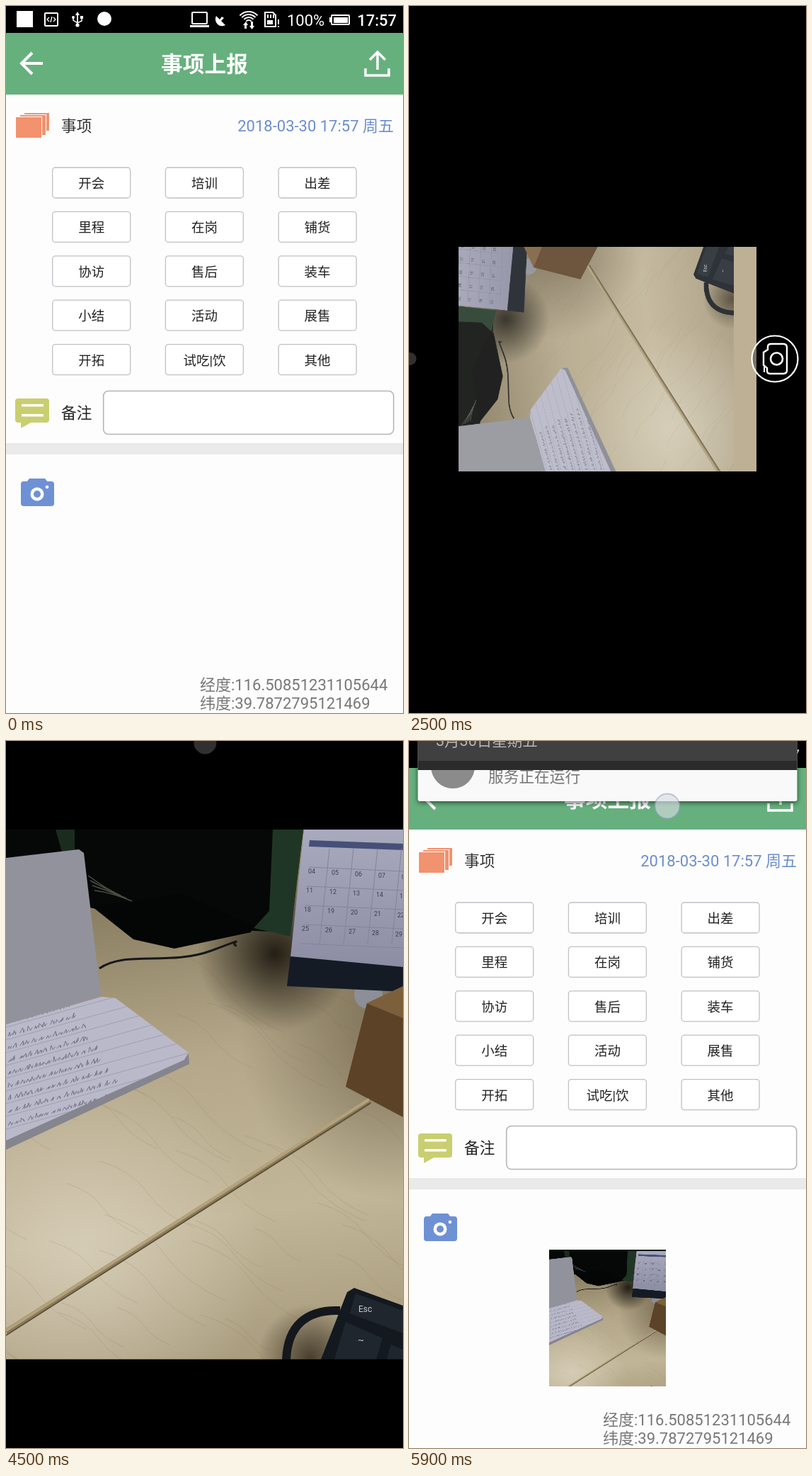
Animation, 561 px wide and 998 px high, one loop 6000 ms. Source, as an HTML page with a canvas:

```html
<!DOCTYPE html>
<html lang="zh-CN">
<meta charset="utf-8">
<style>
  html, body { margin: 0; height: 100%; overflow: hidden; background: #000; }
  canvas { display: block; }
</style>
<canvas id="stage" width="561" height="998"></canvas>
<script>
const W = 561, H = 998, CX = 280.5, CY = 498.5;
const DOWN_X = .5645, DOWN_Y = .5624; // portrait screen fitted into the landscape band
const FONT = 'Roboto, "Noto Sans CJK SC", "Noto Sans CJK", sans-serif';
const stage = document.getElementById('stage').getContext('2d');
let c = stage;

const lerp = (a, b, p) => a + (b - a) * p;
const clamp = v => Math.max(0, Math.min(1, v));
const easeOut = v => 1 - (1 - clamp(v)) ** 5;

function layer() {
  const el = document.createElement('canvas');
  el.width = W;
  el.height = H;
  return el.getContext('2d');
}
function paintOn(target, draw) {
  const previous = c;
  c = target;
  c.save();
  draw();
  c.restore();
  c = previous;
}
function rect(color, x, y, w, h) {
  c.fillStyle = color;
  c.fillRect(x, y, w, h);
}
function path(points) {
  c.beginPath();
  for (let i = 0; i < points.length; i += 2) c.lineTo(points[i], points[i + 1]);
}
function poly(color, ...points) {
  path(points);
  c.fillStyle = color;
  c.fill();
}
function line(color, width, ...points) {
  path(points);
  c.strokeStyle = color;
  c.lineWidth = width;
  c.stroke();
}
function curve(color, width, d) {
  c.strokeStyle = color;
  c.lineWidth = width;
  c.stroke(new Path2D(d));
}
function disc(color, x, y, r) {
  c.beginPath();
  c.arc(x, y, r, 0, 7);
  c.fillStyle = color;
  c.fill();
}
function ring(color, width, x, y, r, from = 0, to = 7) {
  c.beginPath();
  c.arc(x, y, r, from, to);
  c.strokeStyle = color;
  c.lineWidth = width;
  c.stroke();
}
function round(x, y, w, h, r, fill, stroke, width = 1.3) {
  c.beginPath();
  c.roundRect(x, y, w, h, r);
  if (fill) { c.fillStyle = fill; c.fill(); }
  if (stroke) { c.strokeStyle = stroke; c.lineWidth = width; c.stroke(); }
}
function text(s, x, y, size, color, align = 'left', weight = 400) {
  c.font = `${weight} ${size}px ${FONT}`;
  c.textAlign = align;
  c.fillStyle = color;
  c.fillText(s, x, y);
}
function glow(x, y, r, rgb, alpha) {
  const g = c.createRadialGradient(x, y, 0, x, y, r);
  g.addColorStop(0, `rgba(${rgb},${alpha})`);
  g.addColorStop(1, `rgba(${rgb},0)`);
  rect(g, 0, 0, W, H);
}
function turned(degrees, sx, sy, alpha, draw) {
  c.save();
  c.globalAlpha = alpha;
  c.translate(CX, CY);
  c.rotate(degrees * Math.PI / 180);
  c.scale(sx, sy);
  c.translate(-CX, -CY);
  draw();
  c.restore();
}

function statusBar(waves) {
  const w = '#fff';
  rect('#000', 0, 0, W, 38);
  rect(w, 15, 7, 23, 23);
  round(55, 10, 18, 18, 1, null, w, 2);
  line(w, 1.3, 61, 16, 58, 19, 61, 22);
  line(w, 1.3, 67, 16, 70, 19, 67, 22);
  line(w, 1.3, 65, 15, 63, 23);
  line(w, 1.8, 101, 11, 101, 27);
  line(w, 1.5, 95, 17, 95, 20, 101, 24, 107, 21, 107, 17);
  poly(w, 98, 13, 101, 8, 104, 13);
  disc(w, 101, 27, 2.6);
  disc(w, 95, 16, 2);
  rect(w, 105, 14, 4, 4);
  disc(w, 139, 18, 10);
  round(263, 9, 21, 16, 1, null, w, 2);
  rect(w, 260, 27, 27, 3);
  c.fillStyle = w;
  c.fill(new Path2D('M297 14C293 22 301 32 310 27L304 21L308 17L305 15L302 19Z'));
  if (waves) {
    ring(w, 2, 304, 20, 7, -1.5, .1);
    ring(w, 2, 304, 20, 12, -1.5, .1);
  }
  for (const r of [5, 9, 13, 17]) ring(w, 2, 343, 25, r, -2.4, -.75);
  poly(w, 335, 27, 339, 22, 342, 27);
  rect(w, 337, 26, 3, 6);
  poly(w, 344, 28, 351, 28, 347.5, 33);
  rect(w, 346, 22, 3, 7);
  line(w, 2, 366, 9, 377, 9, 381, 13, 381, 29, 366, 29, 366, 8);
  for (const x of [369, 373, 377]) rect(w, x, 12, 2, 5);
  rect(w, 369, 20, 8, 6);
  rect(w, 384, 19, 2, 7);
  rect(w, 384, 28, 2, 2);
  text('100%', 397, 28, 22, w);
  round(460, 13, 25, 13, 1, null, w, 2);
  rect(w, 463, 16, 20, 8);
  rect(w, 457, 16, 3, 7);
  text('17:57', 552, 28, 22, w, 'right', 500);
}

function header() {
  rect('#66b07d', 0, 38, W, 87);
  text('事项上报', 280.5, 93, 30.7, '#fff', 'center', 700);
  line('#fff', 4, 52, 81, 22, 81);
  line('#fff', 4, 37, 66, 22, 81, 37, 96);
  line('#fff', 3.5, 508, 88, 508, 98, 541, 98, 541, 88);
  line('#fff', 3.5, 525, 90, 525, 66);
  line('#fff', 3.5, 514, 76, 525, 65, 536, 76);
}

const LABELS = '开会 培训 出差 里程 在岗 铺货 协访 售后 装车 小结 活动 展售 开拓 试吃|饮 其他'.split(' ');

function form({ waves = true, pressed = false, thumb = false, saving = 0 }) {
  rect('#fefdfe', 0, 0, W, H);
  statusBar(waves);
  header();
  for (const [x, y, w, h] of [[26, 151, 35, 25], [20, 154, 36, 28], [14, 157, 36, 29]]) {
    rect('#fff', x - 1, y - 1, w + 2, h + 2);
    rect('#f2926f', x, y, w, h);
  }
  text('事项', 78, 177, 21.7, '#333');
  text('2018-03-30 17:57 周五', 548, 177, 22, '#6a8dd0', 'right');
  LABELS.forEach((label, i) => {
    const x = 120.7 + i % 3 * 159.7, y = 249.5 + (i / 3 | 0) * 62.4;
    round(x - 55, y - 21.5, 110, 43, 4, '#fff', '#c0c0c6');
    text(label, x, y + 7.5, 18.5, '#222', 'center');
  });
  round(13, 554, 48, 34, 4, '#c9cf70');
  poly('#c9cf70', 21, 586, 21, 596, 37, 587);
  rect('#fff', 22, 562, 31, 3.5);
  rect('#fff', 22, 576, 31, 3.5);
  text('备注', 78, 582, 21.7, '#222');
  round(137.7, 543.5, 410, 61, 7, '#fff', '#b5b5b9', 1.6);
  rect('#ebeaeb', 0, 617, W, 16);

  const blue = pressed ? '#c3c3c7' : '#6e91d5';
  round(21, 671, 47, 35, 4, blue);
  poly(blue, 29, 672, 33, 667, 55, 667, 59, 672);
  disc('#fff', 44, 689, 9.5);
  disc(blue, 44, 689, 5);
  disc('#fff', 58, 679, 2.3);

  text('经度:116.50851231105644', 274, 966, 22, '#777');
  text('纬度:39.7872795121469', 274, 992, 22, '#777');
  if (thumb) {
    c.save();
    c.beginPath();
    c.rect(198, 718, 165, 193);
    c.clip();
    rect('#161a17', 198, 718, 165, 193);
    c.drawImage(desk, 0, 125, W, 748, 198, 720, 165, 220);
    c.restore();
  }
  if (saving) text('正在保存图片...', 277, 563, 20.5, `rgba(120,120,125,${saving})`, 'center');
}

function notebook(rnd) {
  poly('#85858f', 0, 560, 258, 442, 259, 456, 0, 577);
  poly('#92929c', 0, 165, 103, 153, 110, 158, 134, 360, 0, 402);
  poly('#b9b9ca', 0, 400, 135, 361, 155, 363, 258, 440, 252, 450, 0, 564);
  c.save();
  c.clip();
  for (let i = 0; i < 9; i++) {
    const y = 404 + i * 18;
    line('#9899aa', .8, 0, y, 260, y - 72);
    for (let x = 3; x < 90 + i * 9; x += rnd(5, 11)) {
      const b = y - 4 - x * .28;
      line('#6b6c80', .9, x, b, x + rnd(1, 5), b - rnd(4, 8), x + rnd(2, 6), b - 1, x + rnd(4, 8), b - 5);
    }
  }
  c.restore();
}

function calendar() {
  disc('#8c8f98', 512, 358, 20);
  const paper = c.createLinearGradient(0, 125, 0, 320);
  paper.addColorStop(0, '#a9aabd');
  paper.addColorStop(1, '#8c8da4');
  poly(paper, 421, 125, W, 125, W, 320, 402, 305);
  poly('#151b24', 402, 304, W, 319, W, 354, 397, 346);
  poly('#464f78', 429, 140, W, 145, W, 154, 428, 149);
  for (let i = 0; i < 5; i++) {
    line('#82849a', 1, 428 - i * 3, 178 + i * 27, W, 184 + i * 27);
    line('#82849a', 1, 457 + i * 34, 152, 443 + i * 34, 287);
    for (let j = 0; j < 4; j++)
      text(String(4 + j * 7 + i).padStart(2, '0'), 427 + i * 33 - j * 3, 187 + j * 27 + i * 2, 9, '#3d3f50');
  }
}

function keyboard() {
  glow(430, 870, 75, '40,32,20', .75);
  curve('#14181d', 12, 'M472 804C425 802 397 825 396 876');
  poly('#14191f', 445, 873, 482, 778, 492, 772, W, 797, W, 873);
  poly('#20262e', 494, 780, W, 804, W, 836, 486, 808);
  poly('#20262e', 480, 820, 532, 843, 523, 873, 464, 873);
  poly('#20262e', 544, 852, W, 859, W, 873, 538, 873);
  text('Esc', 498, 806, 12, '#c8cbd2');
  text('~', 497, 850, 13, '#c8cbd2');
}

function drawDesk() {
  let seed = 7;
  const rnd = (a, b) => {
    seed = seed * 16807 % 2147483647;
    return a + (b - a) * seed / 2147483647;
  };
  c.beginPath();
  c.rect(0, 125, W, 748);
  c.clip();
  const wood = c.createLinearGradient(180, 230, 280, 873);
  wood.addColorStop(0, '#8a7e62');
  wood.addColorStop(.35, '#b5a88a');
  wood.addColorStop(.7, '#c2b698');
  wood.addColorStop(1, '#aa9d7f');
  rect(wood, 0, 125, W, 748);
  glow(110, 720, 260, '226,219,202', .6);
  glow(560, 420, 230, '60,48,28', .5);
  for (let i = 0; i < 45; i++) {
    const x = rnd(-60, 520), y = rnd(290, 860), l = rnd(50, 150);
    curve('rgba(120,98,62,.18)', 1,
      `M${x} ${y}q${l * .4} ${l * .12} ${l * .6} ${l * .4}t${l * .6} ${l * .45}`);
  }
  // far side: wall, screen and its stand
  glow(380, 300, 110, '22,18,10', .9);
  poly('#060807', 0, 125, 420, 125, 402, 270, 350, 268, 122, 236, 0, 200);
  poly('#1f3626', 377, 125, 420, 125, 402, 276, 350, 264, 372, 240);
  poly('#1a2c1e', 70, 125, 97, 125, 97, 175, 80, 160);
  poly('#040505', 122, 234, 250, 215, 350, 262, 346, 270, 238, 293, 180, 280);
  for (let i = 0; i < 4; i++)
    curve('#4c4d44', 1.5, `M${116 + i * 3} ${190 + i * 7}q25 ${18 - i * 5} ${38 + i * 5} ${24 - i * 3}`);
  curve('#17171a', 3, 'M132 321C170 295 230 318 290 296S312 286 326 289');
  notebook(rnd);
  calendar();
  // box and table seam
  poly('#5c4226', 510, 370, W, 391, W, 531, 480, 488);
  poly('#7c5f3b', 510, 370, W, 346, W, 391);
  line('#8a7b5b', 8, 0, 834, 515, 508);
  line('#b3a27b', 4, 0, 832, 513, 506);
  line('#5a4d34', 1.5, 0, 839, 515, 511);
  keyboard();
}

function cameraScreen({ shift = 0, wash = 0, shutter = true, dot = true }) {
  rect('#000', 0, 340, W, 317);
  c.save();
  c.beginPath();
  c.rect(70, 340, 421, 317);
  c.clip();
  if (shift) rect('#b8aa8a', 70, 340, 421, 317);
  c.translate(shift, 0);
  turned(-90, DOWN_X, DOWN_Y, c.globalAlpha, () => c.drawImage(desk, 0, 0));
  c.translate(-shift, 0);
  if (wash) rect(`rgba(215,213,210,${wash})`, 70, 340, 421, 317);
  c.restore();
  if (dot) disc('#303030', 1.5, 498, 9);
  if (!shutter) return;
  disc('rgba(0,0,0,.35)', 517, 498, 33);
  ring('#fff', 2.2, 517, 498, 32.5);
  curve('#fff', 2.4, 'M512 477H529Q534 477 534 482V514Q534 519 529 519H510Q506 519 506 515V511L501 507V489L507 485V481Q507 477 512 477Z');
  ring('#fff', 2.6, 519.5, 498, 8.5);
  line('#fff', 2, 502, 509, 502, 517);
}

function touch(x, y) {
  disc('rgba(215,222,228,.65)', x, y, 17);
  ring('rgba(150,160,195,.6)', 1.8, x, y, 17.5);
}

function notificationShade(pull) {
  c.save();
  c.translate(0, pull);
  c.shadowColor = 'rgba(0,0,0,.6)';
  c.shadowBlur = 7;
  c.shadowOffsetY = 2;
  round(12.5, -40, 536, 125, 3, '#faf9fa');
  c.shadowColor = 'transparent';
  disc('#8b8b8b', 62, 36, 31);
  text('服务正在运行', 112, 58, 21.7, '#757575');
  rect('#2b2b2b', 12.5, -60, 536, 101);
  rect('#404040', 12.5, -60, 536, 88);
  text('3月30日星期五', 38, 7, 21.5, '#b5b5b5');
  c.restore();
  touch(365, 92 + pull);
}

const deskLayer = layer(), desk = deskLayer.canvas, formLayer = layer();
paintOn(deskLayer, drawDesk);

function showForm(options, top = 0, bottom = H) {
  paintOn(formLayer, () => form(options));
  const h = bottom - top;
  c.drawImage(formLayer.canvas, 0, top, W, h, 0, top, W, h);
}

function opening(t) {
  const p = easeOut((t - 2080) / 358), angle = -90 * (1 - p);
  const spread = lerp(DOWN_X, 1, p), settle = 1 - clamp((t - 2100) / 1100);
  c.save();
  c.beginPath();
  c.rect(0, 340, W, 317);
  c.clip();
  if (p > 0) turned(angle, spread, 1, lerp(.4, 1, p), () => cameraScreen({
    shift: -80 * settle ** 2,
    wash: .4 * (1 - clamp((t - 2100) / 600)),
  }));
  if (p < 1) turned(angle, spread, lerp(DOWN_Y, 317 / H, p), 1 - p, () => showForm({}));
  c.restore();
}

function closing(t) {
  const p = easeOut((t - 4600) / 360), angle = 90 * (1 - p);
  turned(angle, lerp(1 / DOWN_Y, 1, p), lerp(1 / DOWN_X, H / 317, p), 1 - .4 * p, () =>
    cameraScreen({ shutter: false, dot: p === 0, wash: .1 * p }));
  // the window turns in without the system bars
  if (p > 0) turned(angle, 1, 1, p, () => showForm({ saving: .35 * (1 - p) + .1 }, 38, 957));
}

function frame(now) {
  const t = now % 6000;
  c.globalAlpha = 1;
  rect('#000', 0, 0, W, H);
  if (t < 1400) {
    const pressed = t >= 1000 && t < 1300;
    showForm({ waves: t >= 100 && t < 600 || t >= 1100, pressed });
    if (pressed) touch(31, 687);
  } else if (t < 4300) {
    opening(t);
  } else if (t < 4960) {
    closing(t);
  } else {
    showForm({ waves: t < 5100 || t >= 5600, thumb: t >= 5000 });
    if (t >= 5800) notificationShade(Math.min(0, (t - 5900) * .45));
  }
  requestAnimationFrame(frame);
}
requestAnimationFrame(frame);
</script>
</html>
```
